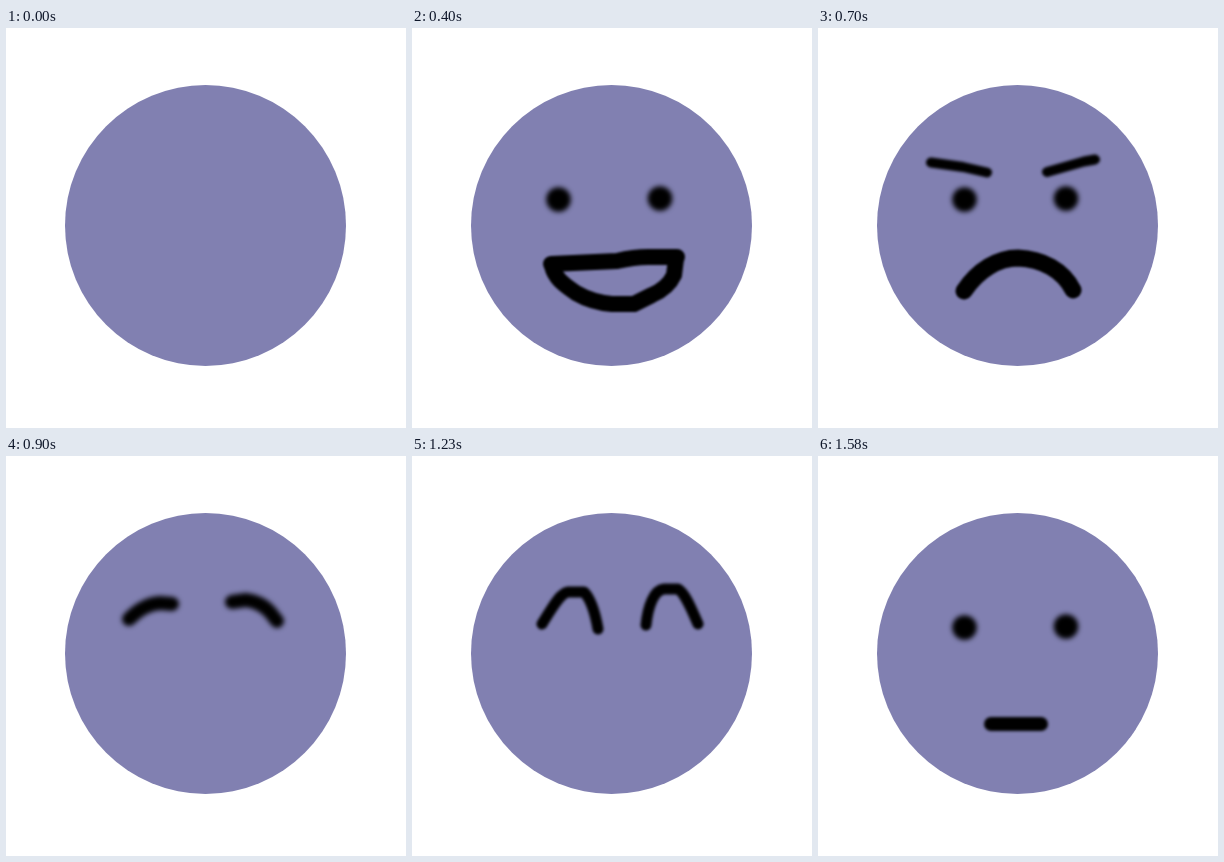
These frames come from a looping animation (400x400 px, 1680 ms). An HTML page:

```html
<!DOCTYPE html>
<html lang="en">
<head>
<meta charset="utf-8">
<title>Moods</title>
<style>
  html, body { margin: 0; width: 100%; height: 100%; overflow: hidden; background: #fff; }
  svg { display: block; width: 100vw; height: 100vh; }
  path { fill: none; stroke: #000; stroke-linecap: round; stroke-linejoin: round; }
  [data-part] { visibility: hidden; }
</style>
</head>
<body>
<svg viewBox="0 0 400 400">
  <defs>
    <filter id="crisp" filterUnits="userSpaceOnUse" width="400" height="400" color-interpolation-filters="sRGB"><feGaussianBlur stdDeviation="1.2"/></filter>
    <filter id="medium" filterUnits="userSpaceOnUse" width="400" height="400" color-interpolation-filters="sRGB"><feGaussianBlur stdDeviation="1.8"/></filter>
    <filter id="soft" filterUnits="userSpaceOnUse" width="400" height="400" color-interpolation-filters="sRGB"><feGaussianBlur stdDeviation="2.5"/></filter>
    <radialGradient id="blush">
      <stop offset="0" stop-color="#e07058"/>
      <stop offset=".3" stop-color="#e07058" stop-opacity=".92"/>
      <stop offset=".65" stop-color="#e07058" stop-opacity=".4"/>
      <stop offset="1" stop-color="#e07058" stop-opacity="0"/>
    </radialGradient>
  </defs>
  <circle cx="199.5" cy="197.5" r="140.5" fill="#8180b1"/>

  <g data-part="eyes" filter="url(#soft)">
    <circle cx="146.5" cy="171.5" r="12.3"/>
    <circle cx="248" cy="170.5" r="12.3"/>
  </g>
  <g data-part="flat" filter="url(#medium)" stroke-width="14">
    <path d="M173 268H223"/>
  </g>
  <g data-part="grin" filter="url(#crisp)" stroke-width="16">
    <path d="M139 236L205 233Q222 229 236 229H265"/>
    <path d="M140 238C143 251 153 257 164 265C176 272 188 275 200 276H222L240 267Q256 260 262 247L264 231"/>
  </g>
  <g data-part="frown" filter="url(#crisp)" stroke-width="17">
    <path d="M146 263C160 242 180 230 200 230C224 231 245 242 255 262"/>
  </g>
  <g data-part="scowl" filter="url(#medium)" stroke-width="10">
    <path d="M113 134.500L145 139L169 144.500M229 144L266 133.500L277 131.500"/>
  </g>
  <g data-part="brows" filter="url(#soft)" stroke-width="14">
    <path d="M123 163Q138 148 154 147L166 148M226 146L240 144Q255 146 264 156L271 165"/>
  </g>
  <g data-part="lids" filter="url(#soft)" stroke-width="14">
    <path d="M128 195Q134 207 141 207L163 208Q170 205 179 199M222 202Q228 202 238 207Q267 215 274 197"/>
  </g>
  <g data-part="smile" filter="url(#soft)" stroke-width="14">
    <path d="M168 259Q180 272 203 272Q231 271 240 254"/>
  </g>
  <g data-part="arches" filter="url(#medium)" stroke-width="11">
    <path d="M130 168C140 152 148 137 156 136H172C178 142 183 156 186 173M234 169C236 150 242 134 252 133H266C273 137 279 152 286 168"/>
  </g>
  <g data-part="beam" filter="url(#medium)" stroke-width="11">
    <path d="M144 241C168 259 188 267 214 268C228 268 236 263 246 261C260 257 274 247 280 235"/>
  </g>
  <g data-part="cheeks" fill="url(#blush)">
    <circle cx="118" cy="210" r="23"/>
    <circle cx="294.500" cy="204" r="23"/>
  </g>
</svg>
<script>
  const LOOP = 1680;
  // Start time in ms and the features visible from then on.
  const poses = [
    [0, ""],
    [100, "eyes"],
    [200, "eyes flat"],
    [300, "eyes"],
    [400, "eyes grin"],
    [500, "eyes"],
    [600, "eyes frown"],
    [700, "eyes frown scowl"],
    [800, ""],
    [900, "brows"],
    [1000, "brows lids"],
    [1100, "brows lids smile"],
    [1230, "arches"],
    [1330, "arches beam cheeks"],
    [1480, "eyes"],
    [1580, "eyes flat"]
  ].map(([start, names]) => ({ start, parts: names.split(" ") }));
  const parts = [...document.querySelectorAll("[data-part]")];

  function render(time) {
    const pose = poses.findLast(({ start }) => start <= time);
    for (const part of parts) {
      part.style.visibility = pose.parts.includes(part.dataset.part) ? "visible" : "hidden";
    }
  }

  const began = performance.now();
  function tick() {
    render((performance.now() - began) % LOOP);
    requestAnimationFrame(tick);
  }
  tick();
</script>
</body>
</html>
```
